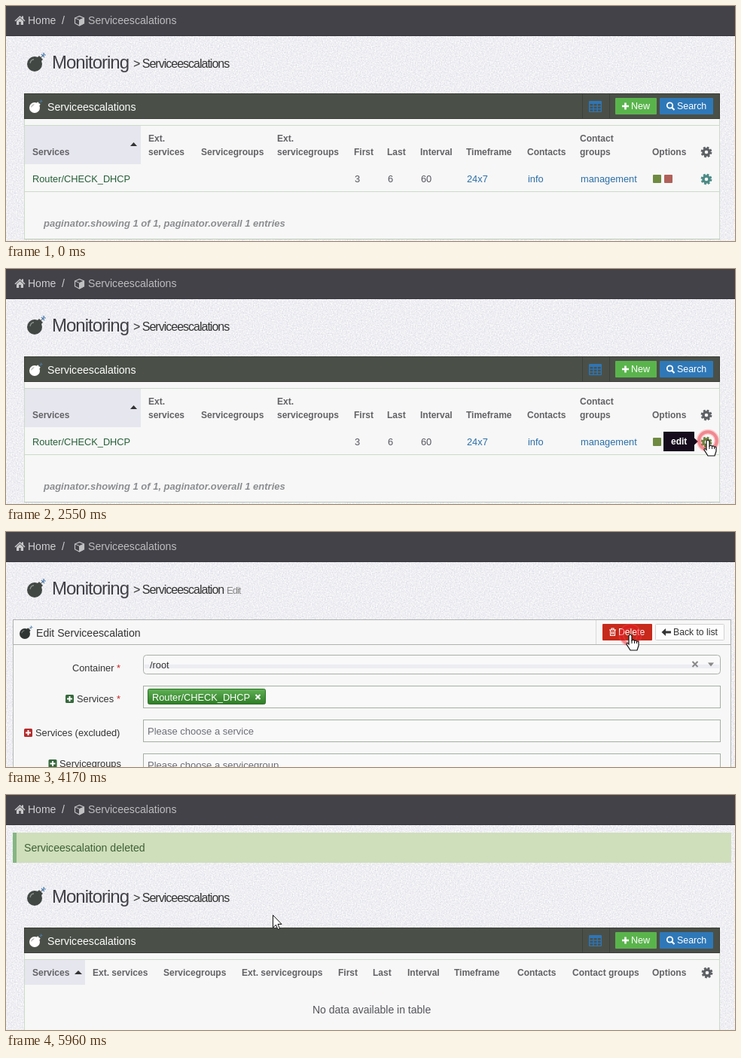
These frames come from a looping animation (968x312 px, 7.96 s). An HTML page:

```html
<!DOCTYPE html>
<html lang="en">
<head>
<meta charset="utf-8">
<title>Service escalation removal</title>
<style>
  html, body { margin: 0; width: 100%; height: 100%; overflow: hidden; background: #efeff3; }
  svg { position: absolute; left: 0; top: 0; }
  text { font-family: "Liberation Sans", Arial, sans-serif; white-space: pre; }
</style>
</head>
<body>
<svg width="968" height="312">
  <filter id="grain" x="0" y="0" width="100%" height="100%" color-interpolation-filters="sRGB">
    <feTurbulence type="fractalNoise" baseFrequency=".6" numOctaves="2" seed="4"/>
    <feColorMatrix values="0 0 0 .2 .835  0 0 0 .2 .835  0 0 0 .1 .903  0 0 0 0 1"/>
  </filter>
  <rect width="968" height="312" filter="url(#grain)"/>
</svg>
<svg id="stage" width="968" height="312" viewBox="0 0 968 312"></svg>

<script>
const LOOP = 7960, STEP = 30, CLICK = 780;

// Drawing helpers: each returns SVG markup
const text = (x, y, s, size = 14.1, fill = '#333', extra = '') =>
  `<text x="${x}" y="${y}" font-size="${size}" fill="${fill}" ${extra}>${s}</text>`;
const rect = (x, y, w, h, fill, extra = '') =>
  `<rect x="${x}" y="${y}" width="${w}" height="${h}" fill="${fill}" ${extra}/>`;
const box = (x, y, w, h, fill, stroke, extra = '') =>
  rect(x + .5, y + .5, w - 1, h - 1, fill, `stroke="${stroke}" ${extra}`);
const path = (d, fill = 'none', stroke = 'none', width = 1) =>
  `<path d="${d}" fill="${fill}" stroke="${stroke}" stroke-width="${width}"/>`;
const group = (id, content) => `<g id="${id}">${content}</g>`;
const gradient = (id, ...stops) => `<linearGradient id="${id}" x2="0" y2="1">${
  stops.map(([at, color]) => `<stop offset="${at}" stop-color="${color}"/>`).join('')}</linearGradient>`;

const bold = (x, y, s) => text(x, y, s, 12, '#626266', 'font-weight="bold"');
const label = (x, y, s, fill = '#333') => text(x, y, s, 12.8, fill);
const tight = 'letter-spacing="-1"';

const bomb = (x, y, r, fill) => `<g transform="translate(${x} ${y}) scale(${r / 10})">
  <circle r="10" fill="${fill}"/>
  ${path('M3-8L6-11 11-6 8-3Z', fill)}
  ${path('M8-8Q9-11 12-11', 'none', '#555')}
  ${path('M-6-1Q-5-6-1-6', 'none', '#8a918c', 1.3)}
  ${path('M10-10l3-3M12-14l1 1M9-13l2 2M13-9l-2-2M12-12h3M12-12v-3', 'none', '#4f7fb0', 1.1)}</g>`;

const gear = (x, y, fill, id = '') => `<g ${id && `id="${id}"`} stroke="${fill}" fill="none" transform="translate(${x} ${y})">
  <circle r="4" stroke-width="3.4"/><circle r="6" stroke-width="2.8" stroke-dasharray="2.6 2.112"/></g>`;

const plus = (x, y, fill) => rect(x - 5.5, y - 5.5, 11, 11, fill, 'rx="1.5"') +
  path(`M${x - 3.5} ${y}h7M${x} ${y - 3.5}v7`, 'none', '#fff', 2);
const cross = (x, y, color, r = 3) =>
  path(`M${x - r} ${y - r}l${2 * r} ${2 * r}m0 ${-2 * r}l${-2 * r} ${2 * r}`, 'none', color, 2);

const navbar = rect(0, 0, 968, 40, '#434248') + rect(0, 39, 968, 1, '#37363c') +
  path('M11.5 19.5L18.5 13l2.5 2.3V13.5h2v3.6l2.5 2.4-1 1L18.5 15l-6 5.5Z', '#c9c9cb') +
  path('M14 20l4.5-4 4.5 4v5h-3.3v-4h-2.4v4H14Z', '#c9c9cb') +
  text(29, 24, 'Home', 14, '#cfcfd1') + text(74, 24, '/', 14, '#cfcfd1') +
  path('M91.5 16l6-2.5 6 2.5v7l-6 3-6-3Z', 'none', '#c0c0c2', 1.2) +
  path('M91.5 16l6 2.5v7.5l6-3v-7l-6 2.5', '#c0c0c2', '#c0c0c2') +
  text(109, 24, 'Serviceescalations', 14.1, '#bdbdbf');

const heading = (y, name, suffix = '') => bomb(38, y - 6, 10, '#414742') +
  text(61, y, 'Monitoring', 24, '#404046', tight) +
  text(169, y - 1, '&gt; ' + name, 16, '#333', tight) +
  text(293, y - 1, suffix, 13, '#888', tight);

const listBar = y => box(24, y, 924, 34, '#4a5047', '#383d36') +
  path(`M765.5 ${y + 1}v32M801.5 ${y + 1}v32`, 'none', '#3c423a') +
  bomb(38, y + 19, 7, '#fff') + text(55, y + 23, 'Serviceescalations', 14.1, '#fff') +
  rect(774, y + 10, 17, 15, '#2f75b6', 'rx="1"') +
  [0, 1, 2].map(r => [0, 1, 2].map(c =>
    rect(775.5 + c * 5.2, y + 14 + r * 3.7, 3.8, 2.4, '#4a5047')).join('')).join('') +
  rect(809, y + 6, 55, 22, '#5ab44c', 'rx="1"') +
  path(`M818 ${y + 17}h9M822.5 ${y + 12.5}v9`, 'none', '#fff', 2.6) +
  text(830, y + 21, 'New', 12.5, '#fff') +
  rect(868, y + 6, 71, 22, '#2f78b8', 'rx="1"') +
  `<circle cx="881.5" cy="${y + 16}" r="3.7" fill="none" stroke="#fff" stroke-width="1.8"/>` +
  path(`M884 ${y + 18.5}l3.5 3.5`, 'none', '#fff', 2.2) +
  text(891, y + 21, 'Search', 12.4, '#fff');

const listPanel = (y, h) => box(24, y, 924, h, '#f7f7f7', '#cbdcc8');

const list = heading(83, 'Serviceescalations') + listPanel(149, 161) + listBar(116) +
  rect(25, 158, 922, 1, '#cbdcc8') + rect(25, 159, 154, 51, '#e6e6ef') +
  rect(25, 246, 922, 1, '#cbdcc8') + rect(24, 309, 924, 1, '#b9cbb6') +
  path('M165 186h9l-4.5-5Z', '#333') +
  [[35, 'Services'], [259, 'Servicegroups'], [462, 'First'], [506, 'Last'], [550, 'Interval'],
   [611, 'Timeframe'], [692, 'Contacts'], [858, 'Options']].map(([x, s]) => bold(x, 198, s)).join('') +
  [[189, 'Ext.', 'services'], [360, 'Ext.', 'servicegroups'], [762, 'Contact', 'groups']]
    .map(([x, a, b]) => bold(x, 180, a) + bold(x, 198, b)).join('') +
  label(35, 234, 'Router/CHECK_DHCP', '#265f38') +
  [[463, '3'], [507, '6'], [551, '60']].map(([x, s]) => label(x, 234, s, '#55565e')).join('') +
  [[612, '24x7'], [693, 'info'], [763, 'management']].map(([x, s]) => label(x, 234, s, '#2b6ea6')).join('') +
  rect(859, 224, 11, 11, '#6f8a41', 'rx="1"') + rect(874, 224, 11, 11, '#b0605a', 'rx="1"') +
  gear(930, 194, '#5d6064') + gear(930, 230, '#4b8a86', 'rowGear') +
  text(50, 293, 'paginator.showing 1 of 1, paginator.overall 1 entries', 13, '#8b8d90',
    'font-weight="bold" font-style="italic"') +
  group('tooltip', path('M873 216h41v8.5l5 4.5-5 4.5v8.5h-41Z', '#150b1c') +
    text(883, 233, 'edit', 12, '#fff', 'font-weight="bold"'));

const deleteButton = (id, fill) => group(id, rect(792, 122, 66, 22, fill, 'rx="1"') +
  path('M801 130h9M804 129.5v-1.5h3v1.5M802.5 130.5v7h6v-7M804.5 132v4M806.5 132v4', 'none', '#fff', 1.1) +
  text(813, 137, 'Delete', 12.2, '#fff'));

const field = (y, h) => box(182, y, 767, h, '#f9f9f9', '#a3b1a3');

const edit = heading(83, 'Serviceescalation', 'Edit') +
  box(9, 116, 954, 210, '#f7f7f7', '#b4b8b4') + box(9, 116, 954, 34, '#f7f7f7', '#b0b2b0') +
  bomb(25, 135, 7, '#2f3532') + text(40, 139, 'Edit Serviceescalation') +
  rect(783, 117, 1, 32, '#dadada') +
  deleteButton('deletePlain', '#d9534f') + deleteButton('deleteHover', '#c7291b') +
  box(862, 122, 92, 22, '#fdfdfd', '#d2d2d2', 'rx="1"') +
  path('M870.5 133l5.5-5v3.5h7v3h-7v3.5Z', '#333') + text(886, 137, 'Back to list', 12.2) +
  label(88, 185, 'Container') + label(147, 185, '*', '#d02020') +
  box(182, 163, 767, 26, '#f9f9f9', '#a9afa9', 'rx="4"') + rect(184, 176, 763, 5, '#ececf3') +
  label(191, 181, '/root') + cross(915, 175.5, '#888', 3.5) + path('M932 173.5h8l-4 5Z', '#888') +
  plus(84.5, 221.5, '#35683b') + label(94, 226, 'Services') + label(147, 226, '*', '#d02020') +
  field(204, 30) + box(188, 208, 157, 21, 'url(#tagFill)', '#2d7226', 'rx="2"') +
  label(194, 224, 'Router/CHECK_DHCP', '#fff') + cross(334.5, 219, '#fff') +
  plus(29.5, 266.5, '#b52b2b') + label(39, 271, 'Services (excluded)') +
  field(249, 30) + text(188, 269, 'Please choose a service', 13, '#6c6f78') +
  plus(62, 307.5, '#35683b') + label(71, 312, 'Servicegroups') +
  field(294, 30) + text(188, 314, 'Please choose a servicegroup', 13, '#6c6f78');

const dialog = rect(0, 0, 968, 312, 'rgba(38,52,48,.53)') + deleteButton('deleteDimmed', '#b43e45') +
  box(265, 47, 240, 144, '#f9f9f9', '#4f5754') + rect(266, 133, 238, 1, '#e2e2e2') +
  text(385, 95, 'Really delete?', 12.3, '#111', 'text-anchor="middle"') +
  box(318, 148, 74, 24, 'url(#buttonFill)', '#3b8fb8', 'rx="2"') +
  box(319, 149, 72, 22, 'none', '#5cc8ec', 'rx="1"') +
  group('okHover', rect(320, 150, 70, 20, '#cfe9f7')) +
  text(355, 164, 'OK', 12, '#111', 'text-anchor="middle"') +
  box(404, 148, 73, 24, 'url(#buttonFill)', '#707070', 'rx="2"') +
  text(440, 164, 'Abbrechen', 12, '#111', 'text-anchor="middle"');

const done = rect(9, 50, 954, 40, '#cfdebb') + rect(9, 50, 5, 40, '#86b682') +
  text(24, 75, 'Serviceescalation deleted', 14.1, '#3c6136') +
  heading(143, 'Serviceescalations') + listPanel(209, 120) + listBar(176) +
  rect(25, 218, 922, 1, '#cbdcc8') + rect(25, 219, 80, 33, '#e6e6ef') +
  path('M91 238h10l-5-5Z', '#333') +
  [[35, 'Services'], [115, 'Ext. services'], [209, 'Servicegroups'], [313, 'Ext. servicegroups'],
   [441, 'First'], [487, 'Last'], [533, 'Interval'], [595, 'Timeframe'], [679, 'Contacts'],
   [752, 'Contact groups'], [858, 'Options']].map(([x, s]) => bold(x, 240, s)).join('') +
  gear(931, 236, '#5d6064') + text(407, 290, 'No data available in table', 14, '#54555b');

const pointer = path('M.5 .5V17L4.5 13.5 7 19.5 9.5 18.5 7 12.5H12Z', '#fff', '#111');
const hand = path('M-2 13V2Q0-2 2 2V8Q4 6 5.5 8.5 7.5 7 8.5 9.5 11 8 11 11V15L9 21H0L-5 13Q-5 10-2 13Z',
  '#fff', '#111', 1.2) + path('M2 8v4M5.5 8.5v3.5M8.5 9.5v2.5', 'none', '#111');

const stage = document.getElementById('stage');
stage.innerHTML = `<defs>
  ${gradient('tagFill', [0, '#5fb154'], [1, '#2f7c27'])}
  ${gradient('buttonFill', [0, '#f5f5f5'], [.3, '#e9e9f2'], [.5, '#f0f0f0'], [.6, '#d8e2d5'], [1, '#dde6da'])}
  </defs>` + navbar + group('list', list) + group('edit', edit) + group('dialog', dialog) + group('done', done) +
  group('ripple', '<circle fill="none" stroke="#ff5a62"/><circle fill="#e8101c" stroke="#e8101c"/>') +
  group('cursor', group('pointer', pointer) + group('hand', hand));

const $ = id => document.getElementById(id);
const show = (id, on) => { $(id).style.display = on ? '' : 'none'; };
const within = (t, from, to) => t >= from && t < to;

// Straight cursor runs: start, end, from x, y, to x, y
const moves = [
  [1390, 1840, 768, 306, 932, 227],
  [2820, 3060, 929, 218, 829, 136],
  [4530, 5010, 836, 132, 354, 159],
];
// Clicks: start, centre x, y
const clicks = [[2100, 932, 228], [3720, 829, 137], [5240, 354, 160]];

const stepped = (t, start) => Math.floor((t - start) / STEP) * STEP;

function cursorAt(t) {
  const changeTimes = [1390, 2820, 4440];
  const index = Math.max(0, changeTimes.filter(time => t >= time).length - 1);
  const [start, end, x0, y0, x1, y1] = moves[index];
  const p = Math.min(1, Math.max(0, stepped(t, start) / (end - start)));
  return [x0 + (x1 - x0) * p, y0 + (y1 - y0) * p];
}

function drawRipple(t) {
  const click = clicks.find(([start]) => within(t, start + STEP, start + CLICK));
  const visible = click && t < 5960;
  show('ripple', visible);
  if (!visible) return;
  const [start, x, y] = click, p = stepped(t, start) / CLICK;
  const [glow, ring] = $('ripple').children;
  $('ripple').setAttribute('transform', `translate(${x} ${y})`);
  $('ripple').setAttribute('opacity', Math.min(1, 1.3 * (1 - p)));
  ring.setAttribute('fill-opacity', Math.max(0, 1.2 - 2.2 * p));
  for (const [circle, width, opacity] of [[glow, 7, .5], [ring, 4, .8]]) {
    circle.setAttribute('r', 20.5 * p);
    circle.setAttribute('stroke-width', width);
    circle.setAttribute('opacity', opacity);
  }
}

function draw(now) {
  const t = now % LOOP;
  show('list', t < 2820);
  show('edit', within(t, 2820, 5960));
  show('dialog', within(t, 4440, 5240));
  show('done', t >= 5960);

  const onGear = within(t, 1840, 2820);
  show('tooltip', onGear);
  $('rowGear').setAttribute('stroke', onGear ? '#6d8040' : '#4b8a86');
  show('deletePlain', t < 3060);
  show('deleteHover', t >= 3060);
  show('okHover', t >= 4980);

  const pointing = onGear || within(t, 3060, 4440);
  show('cursor', t >= 1390);
  show('hand', pointing);
  show('pointer', !pointing);
  $('cursor').setAttribute('transform', `translate(${cursorAt(t).map(Math.round)})`);
  drawRipple(t);
  requestAnimationFrame(draw);
}
draw(performance.now());
</script>
</body>
</html>
```
